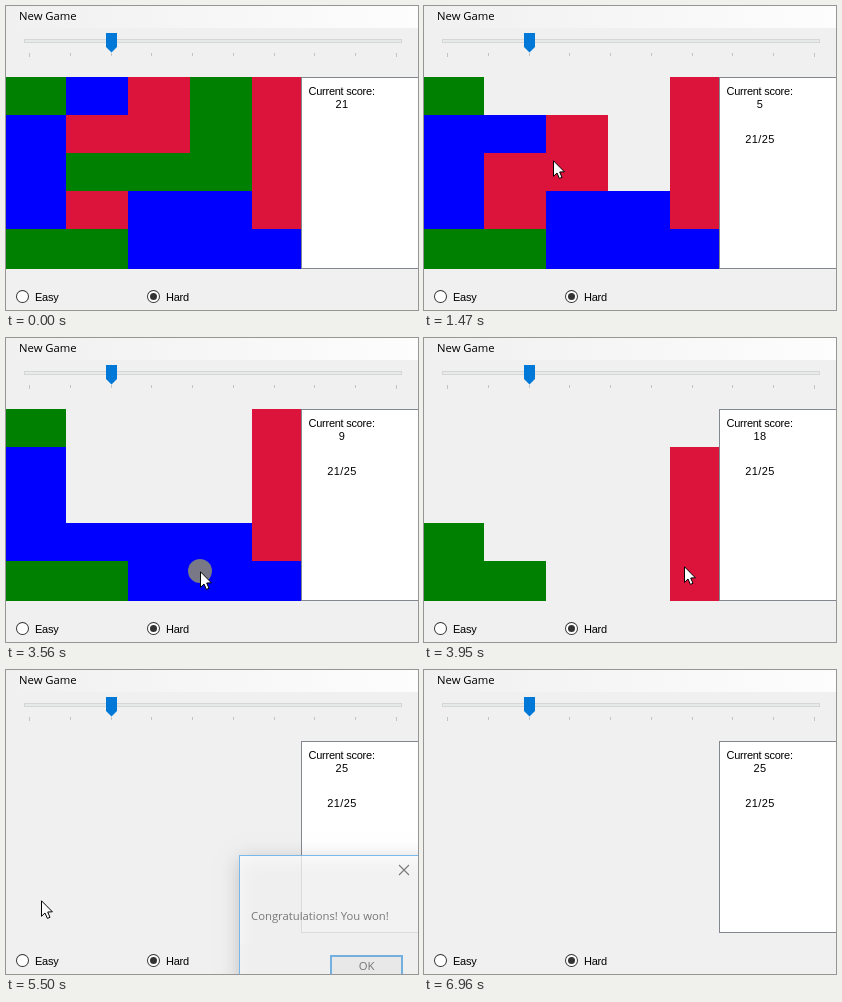
Animation, 412 px wide and 304 px high, one loop 7260 ms. Source, as an HTML page with a canvas:

```html
<!DOCTYPE html>
<html>
<head>
<meta charset="utf-8">
<style>
html, body { margin: 0; width: 100%; height: 100%; overflow: hidden; background: #f0f0f0; }
canvas { display: block; }
</style>
</head>
<body>
<canvas id="stage" width="412" height="304"></canvas>
<script>
const ctx = document.getElementById('stage').getContext('2d');
const LOOP = 7260;
const TICK = LOOP / 94; // the screen refreshes in even ticks
const UI = '11.3px "Open Sans", "Noto Sans", sans-serif';
const FORM = '11px "Liberation Sans", Arial, sans-serif';
const FACE = '#f0f0f0';
const BLUE = '#0078d7';

const COLOURS = { G: '#008000', B: '#0000ff', R: '#dc143c' };
const BOARD = { x: -2, y: 71, w: 62, h: 38 };
const START = ['GBRGR', 'BRRGR', 'BGGGR', 'BRBBR', 'GGBBB'];

// Mouse strokes in ticks: each glides evenly to its end point
const STROKES = [
  { at: 2, steps: 1, x: 211, y: 133 },
  { at: 3, steps: 4, x: 202, y: 115 },
  { at: 16, steps: 4, x: 129, y: 154 },
  { at: 33, steps: 3, x: 194, y: 233 },
  { at: 49, steps: 3, x: 260, y: 228 },
  { at: 52, steps: 2, x: 299, y: 216 },
  { at: 55, steps: 4, x: 270, y: 200 },
  { at: 62, steps: 4, x: 65, y: 224 },
  { at: 66, steps: 3, x: 35, y: 230 },
  { at: 72, steps: 8, x: 319, y: 285 },
  { at: 80, steps: 4, x: 362, y: 291 }
];

// Presses take effect one tick later
const PRESSES = [13, 30, 46, 60, 70];
const OK_PRESS = 87;
const DIALOG = { open: 71, hover: 81, close: OK_PRESS + 1 };
const CURSOR_GONE = OK_PRESS + 3;

function cursorAt(tick) {
  let x = 0, y = 0;
  for (const s of STROKES) {
    const p = Math.min(1, Math.max(0, (tick - s.at + 1) / s.steps));
    x += (s.x - x) * p;
    y += (s.y - y) * p;
  }
  return { x: Math.round(x), y: Math.round(y) };
}

function clearGroup(grid, row, col) {
  const colour = grid[row][col];
  const stack = [[row, col]];
  let count = 0;
  while (stack.length) {
    const [r, c] = stack.pop();
    if (!grid[r] || grid[r][c] !== colour) continue;
    grid[r][c] = '';
    count++;
    stack.push([r + 1, c], [r - 1, c], [r, c + 1], [r, c - 1]);
  }
  return count;
}

function dropColumns(grid) {
  for (let c = 0; c < 5; c++) {
    const kept = grid.map(row => row[c]).filter(Boolean);
    while (kept.length < 5) kept.unshift('');
    kept.forEach((cell, r) => { grid[r][c] = cell; });
  }
}

function playGame() {
  let grid = START.map(row => [...row]);
  let score = 0;
  const states = [{ at: 0, grid, score: 21, best: '' }];
  for (const press of PRESSES) {
    const { x, y } = cursorAt(press);
    const row = Math.floor((y - BOARD.y) / BOARD.h);
    const col = Math.floor((x - BOARD.x) / BOARD.w);
    grid = grid.map(cells => [...cells]);
    score += clearGroup(grid, row, col);
    dropColumns(grid);
    states.push({ at: press + 1, grid, score, best: '21/25' });
  }
  return states;
}
const states = playGame();

function rect(x, y, w, h, fill) {
  ctx.fillStyle = fill;
  ctx.fillRect(x, y, w, h);
}

function box(x, y, w, h, border, fill, line = 1) {
  rect(x, y, w, h, fill);
  ctx.strokeStyle = border;
  ctx.lineWidth = line;
  ctx.strokeRect(x + line / 2, y + line / 2, w - line, h - line);
}

function disc(x, y, r, fill) {
  ctx.beginPath();
  ctx.arc(x, y, r, 0, Math.PI * 2);
  ctx.fillStyle = fill;
  ctx.fill();
}

function polygon(points, fill) {
  ctx.beginPath();
  points.forEach(([x, y]) => ctx.lineTo(x, y));
  ctx.closePath();
  ctx.fillStyle = fill;
  ctx.fill();
}

function text(str, x, y, font, spacing = 0, align = 'left') {
  ctx.font = font;
  ctx.letterSpacing = spacing + 'px';
  ctx.textAlign = align;
  ctx.fillStyle = '#000';
  ctx.fillText(str, x, y);
}

const label = (str, x, y) => text(str, x, y, FORM, -0.25);
const number = (str, y) => text(str, 336, y, FORM, 0.35, 'center');

function drawMenu() {
  const shade = ctx.createLinearGradient(0, 0, 412, 0);
  shade.addColorStop(0, FACE);
  shade.addColorStop(1, '#fdfdfd');
  rect(0, 0, 412, 22, shade);
  text('New Game', 13, 14, UI);
}

function drawSlider() {
  box(18, 33, 378, 4, '#d6d6d6', '#e7eaea');
  for (let i = 0; i < 10; i++) {
    rect(Math.round(23 + i * 40.78), 47, 1, i % 9 ? 3 : 4, '#c4c4c4');
  }
  polygon([[100, 27], [111, 27], [111, 41], [105.5, 46.5], [100, 41]], BLUE);
}

function drawRadio(x, name, on) {
  disc(x, 290.5, 6.5, '#333');
  disc(x, 290.5, 5.5, '#fff');
  if (on) disc(x, 290.5, 3.5, '#333');
  label(name, x + 12.5, 295);
}

function drawGame({ grid, score, best }) {
  // Cells run 2px long: the next row, or nothing, covers the excess
  grid.forEach((row, r) => row.forEach((cell, c) => {
    if (cell) rect(BOARD.x + c * BOARD.w, BOARD.y + r * BOARD.h, BOARD.w, BOARD.h + 2, COLOURS[cell]);
  }));
  rect(295, 71, 117, 194, FACE);
  box(295, 71, 130, 192, '#828790', '#fff');
  label('Current score:', 302.5, 89);
  number(String(score), 102);
  number(best, 137);
}

function drawDialog(tick) {
  if (tick < DIALOG.open || tick > DIALOG.close) return;
  const hover = tick >= DIALOG.hover;
  const pressed = tick >= OK_PRESS;
  ctx.save();
  if (tick === DIALOG.open || tick === DIALOG.close) ctx.globalAlpha = 0.5;

  ctx.save();
  ctx.shadowColor = 'rgba(0, 0, 0, 0.4)';
  ctx.shadowBlur = 18;
  ctx.shadowOffsetY = 4;
  rect(233, 185, 200, 140, '#fff');
  ctx.restore();
  box(233, 185, 200, 140, BLUE, '#fff');
  rect(234, 274, 178, 30, FACE);

  ctx.strokeStyle = '#000';
  ctx.lineWidth = 1.1;
  ctx.beginPath();
  for (const dir of [1, -1]) {
    ctx.moveTo(398 - 5 * dir, 195);
    ctx.lineTo(398 + 5 * dir, 205);
  }
  ctx.stroke();

  text('Congratulations! You won!', 245, 250, UI);
  const fill = pressed ? '#cce4f7' : hover ? '#e5f1fb' : '#e1e1e1';
  box(324, 285, 73, 22, pressed ? '#005499' : BLUE, fill, hover ? 1 : 2);
  text('OK', 360.5, 300, UI, 0, 'center');
  ctx.restore();
}

function drawCursor(tick) {
  if (tick < STROKES[0].at || tick >= CURSOR_GONE) return;
  const { x, y } = cursorAt(tick);
  if ([...PRESSES, OK_PRESS].includes(tick)) disc(x, y, 12, 'rgba(255, 255, 0, 0.47)');
  ctx.save();
  ctx.translate(x, y);
  polygon([[0.5, 0.8], [0.5, 16.3], [4, 13], [6.4, 18.4], [9, 17.3], [6.7, 12], [11.4, 11.8]], '#fff');
  ctx.strokeStyle = '#000';
  ctx.lineWidth = 1;
  ctx.stroke();
  ctx.restore();
}

function draw(time) {
  const tick = Math.floor(time / TICK + 0.06);
  rect(0, 0, 412, 304, FACE);
  drawMenu();
  drawSlider();
  drawGame(states.filter(s => s.at <= tick).pop());
  drawRadio(16.5, 'Easy', false);
  drawRadio(147.5, 'Hard', true);
  drawDialog(tick);
  drawCursor(tick);
}

const begin = performance.now();
function frame() {
  draw((performance.now() - begin) % LOOP);
  requestAnimationFrame(frame);
}
frame();
</script>
</body>
</html>
```
